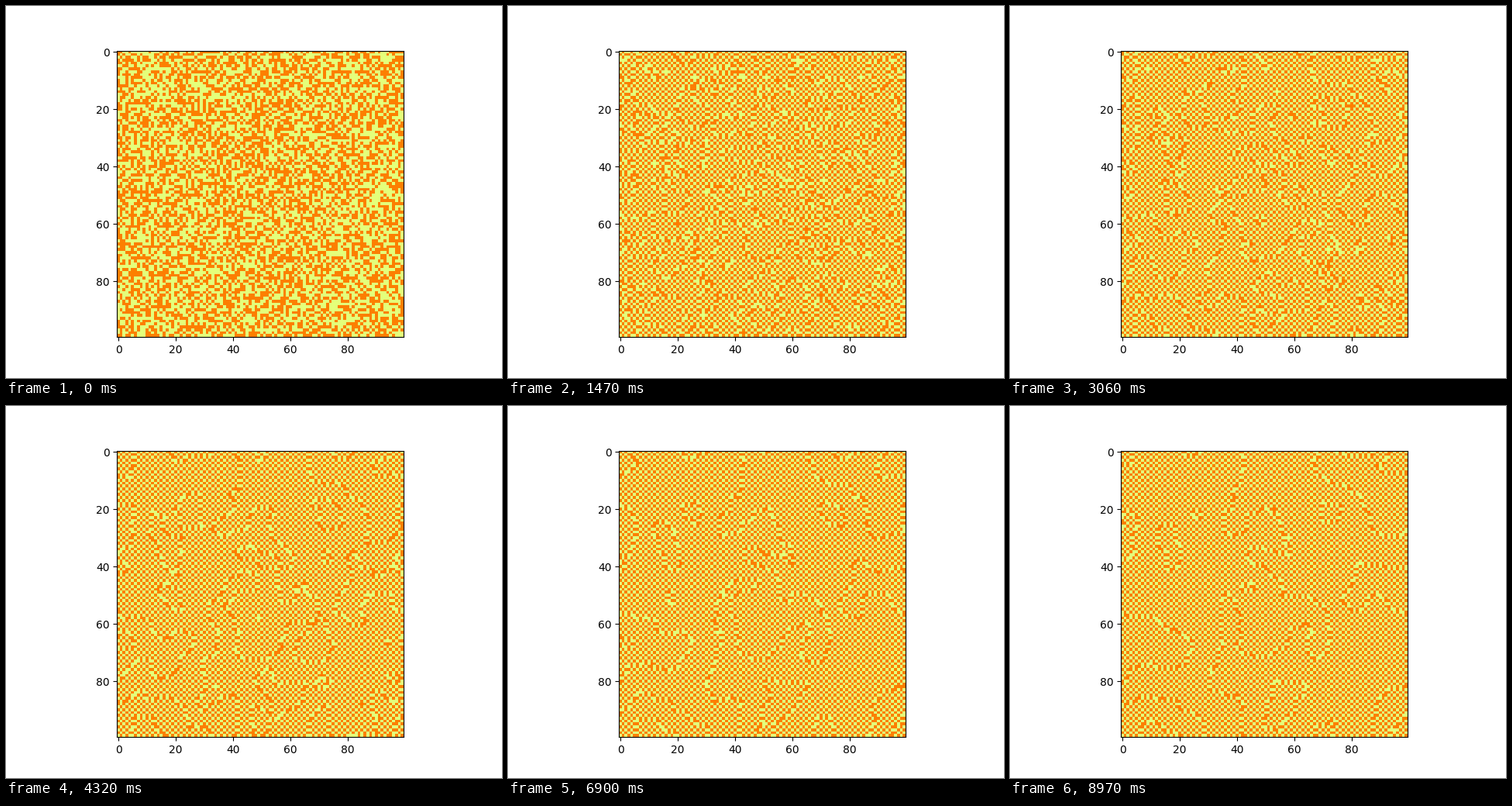
These frames come from a looping animation (640 by 480 pixels, 9 s). A matplotlib script:

```python
from math import exp

import numpy as np
import matplotlib.pyplot as plt
from matplotlib.animation import FuncAnimation

SIZE = 100
FRAMES = 300
INTERVAL = 30
FLIPS = 1000         # attempted flips per frame
WARMUP = 2           # batches already run when the loop starts
COUPLING = -1.0      # negative: neighbours prefer to differ
TEMPERATURE = 1.0

rng = np.random.default_rng(7)


def sweep(spins):
    """One batch of Metropolis flips at random sites, on a torus."""
    sites = rng.integers(SIZE, size=(FLIPS, 2)).tolist()
    chances = rng.random(FLIPS).tolist()
    for (r, c), chance in zip(sites, chances):
        around = (spins[r - 1][c] + spins[(r + 1) % SIZE][c]
                  + spins[r][c - 1] + spins[r][(c + 1) % SIZE])
        cost = 2 * COUPLING * spins[r][c] * around
        if cost <= 0 or chance < exp(-cost / TEMPERATURE):
            spins[r][c] *= -1


def run_lattice():
    """Quench a random spin lattice and keep one snapshot per frame."""
    spins = rng.choice([-1, 1], size=(SIZE, SIZE)).tolist()
    history = []
    for step in range(WARMUP + FRAMES):
        if step >= WARMUP:
            history.append(np.array(spins))
        sweep(spins)
    return history


history = run_lattice()

fig, ax = plt.subplots(figsize=(6.4, 4.8), dpi=100)
image = ax.imshow(history[0], cmap="Wistia", vmin=-1, vmax=1,
                  interpolation="nearest")


def update(i):
    image.set_data(history[i])
    return (image,)


anim = FuncAnimation(fig, update, frames=FRAMES, interval=INTERVAL,
                     repeat=True, repeat_delay=0)
plt.show()
```
